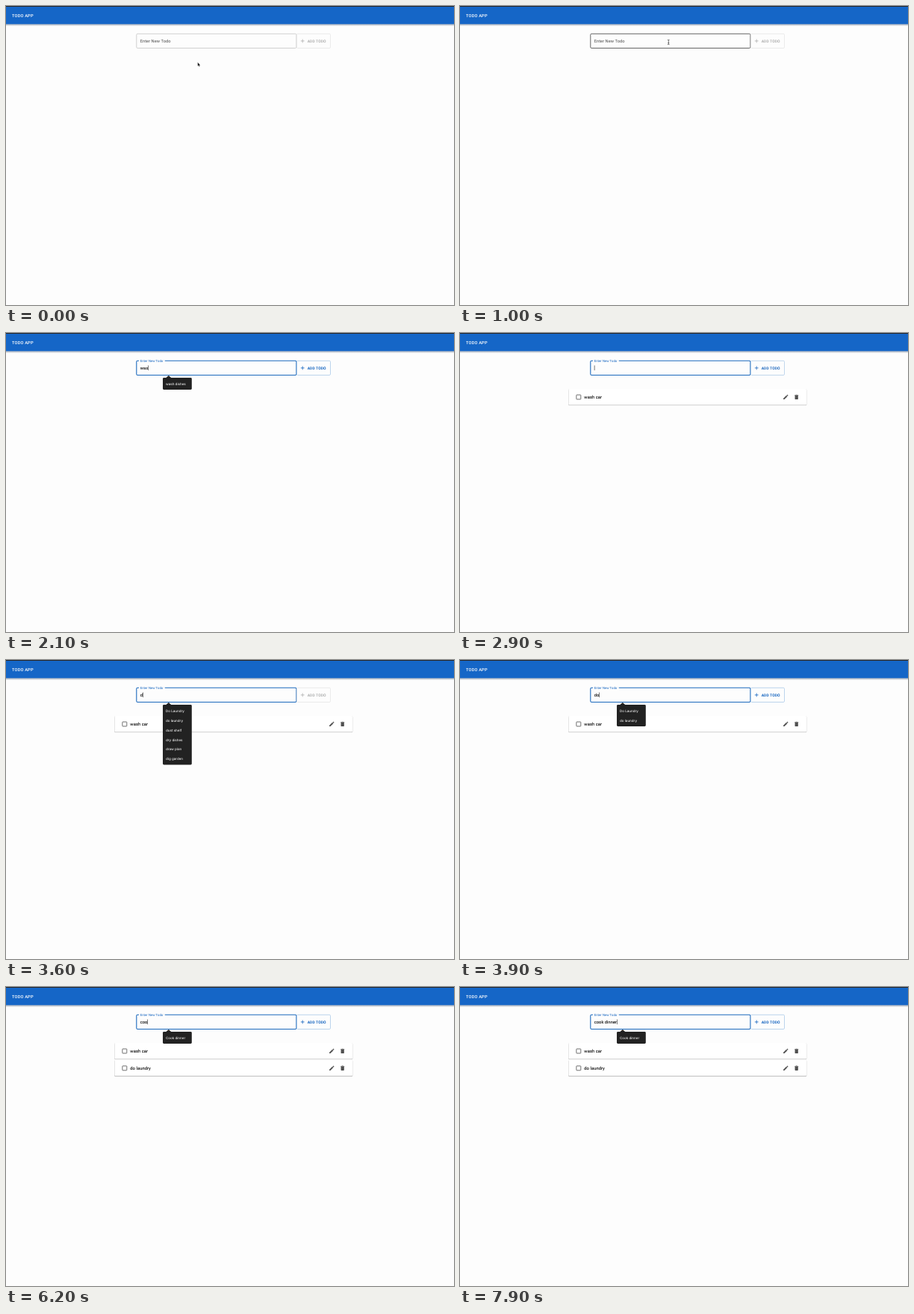
An HTML page for the animation above (8000 ms loop, 600 by 401 pixels).

```html
<!DOCTYPE html>
<html lang="en">
<head>
<meta charset="utf-8">
<title>Todo app</title>
<style>
  html, body { margin: 0; width: 100%; height: 100%; overflow: hidden; background: #fdfdfd; }
  svg { display: block; width: 100vw; height: 100vh; }
  text { font-family: Roboto, sans-serif; letter-spacing: .00938em; text-rendering: geometricPrecision; white-space: pre; }
  .title, .action { font-weight: 500; letter-spacing: .02857em; }
  .title { font-size: 5.7px; fill: #fff; }
  .action { font-size: 4.95px; stroke-width: .14; }
  .field { font-size: 5.7px; }
  .item { font-size: 5.8px; }
  .item, #value { fill: #111; stroke: #111; stroke-width: .1; }
  #menu text { font: 500 4.5px Inter, sans-serif; letter-spacing: 0; fill: #eee; }
</style>
</head>
<body>
<svg viewBox="0 0 600 401">
  <defs>
    <linearGradient id="shade" x2="0" y2="1">
      <stop stop-color="#1c3050" stop-opacity=".45"/>
      <stop offset="1" stop-color="#1c3050" stop-opacity="0"/>
    </linearGradient>
    <g id="row">
      <rect x="145" y="75.1" width="319.4" height="22.2" rx="1.5" fill="#000" fill-opacity=".1"/>
      <rect x="145.3" y="75.5" width="318.8" height="21.5" rx="1.3" fill="#000" fill-opacity=".24"/>
      <rect x="145.4" y="75" width="318.6" height="21.4" rx="1.2" fill="#fff"/>
      <rect x="155.9" y="83" width="5.9" height="5.9" rx=".5" fill="none" stroke="#555" stroke-width=".85"/>
      <g fill="#505050">
        <path transform="translate(432 81.6) scale(.357)" d="M3 17.25V21h3.75L17.81 9.94l-3.75-3.75zM20.71 7.04c.39-.39.39-1.02 0-1.41l-2.34-2.34a1 1 0 0 0-1.41 0l-1.83 1.83 3.75 3.75z"/>
        <path transform="translate(446.4 81.6) scale(.357)" d="M6 19c0 1.1.9 2 2 2h8c1.1 0 2-.9 2-2V7H6zM19 4h-3.5l-1-1h-5l-1 1H5v2h14z"/>
      </g>
    </g>
  </defs>

  <rect y="24.2" width="600" height="2.8" fill="url(#shade)"/>
  <rect width="600" height="24.3" fill="#1566c7"/>
  <rect width="600" height="1" fill="#2a2624"/>
  <text class="title" x="8" y="14.9">TODO APP</text>

  <g id="car"><use href="#row"/><text class="item" x="166.3" y="87.9">wash car</text></g>
  <g id="laundry" transform="translate(0 22.9)"><use href="#row"/><text class="item" x="166.3" y="87.9">do laundry</text></g>

  <rect id="outline" x="174.8" y="37.3" width="214.1" height="19.2" rx="1.4" fill="none"/>
  <rect id="notch" x="178" y="36.2" height="2.2" fill="#fdfdfd"/>
  <text class="field" id="label">Enter New Todo</text>
  <text class="field" id="value" x="179.8" y="48.9"></text>
  <rect id="caret" y="43.5" width=".6" height="6.6" fill="#222"/>

  <rect id="buttonEdge" x="389.4" y="37.3" width="45.1" height="19.2" rx="1.4" fill="none" stroke-width=".7"/>
  <path id="plus" d="M394.8 46.9h4.8M397.2 44.5v4.8" stroke-width=".8"/>
  <text class="action" id="buttonText" x="403.7" y="48.7">ADD TODO</text>

  <g id="menu">
    <path d="M213.8 60.4l4-3.4 4 3.4z" fill="#222"/>
    <rect id="menuBox" x="210" y="60" width="38.8" rx="1.4" fill="#222"/>
    <g id="menuItems"></g>
  </g>

  <path id="arrow" d="M0 0v5.2l1.2-1.1.8 1.8.9-.4-.8-1.7h1.6z" fill="#111" stroke="#fff" stroke-width=".3"/>
  <path id="beam" d="M278 45.3q1.3 0 1.3 1 0-1 1.3-1M279.3 46.3v4.4M278 51.7q1.3 0 1.3-1 0 1 1.3 1M278.4 49.4h1.8" fill="none" stroke="#222" stroke-width=".6"/>
</svg>

<script>
const LOOP = 8000;
const $ = id => document.getElementById(id);

// Each step holds from its time until the next one.
const typing = [
  [0, ''], [1600, 'w'], [1900, 'wa'], [2100, 'was'], [2200, 'wash'], [2300, 'wash '],
  [2400, 'wash c'], [2500, 'wash ca'], [2700, 'wash car'], [2880, ''],
  [3600, 'd'], [3800, 'do'], [4000, 'do '], [4200, 'do l'], [4400, 'do la'],
  [4500, 'do lau'], [4600, 'do laund'], [4800, 'do laundr'], [4900, 'do laundry'], [5200, ''],
  [5900, 'c'], [6000, 'co'], [6200, 'coo'], [6400, 'cook'], [6600, 'cook '],
  [6800, 'cook d'], [7200, 'cook di'], [7300, 'cook din'], [7400, 'cook dinn'], [7500, 'cook dinner']
];
const menus = [
  [0, []],
  [1250, ['wash dishes', 'Do Laundry', 'do laundry', 'Cook dinner', 'clean room', 'dust shelf']],
  [1600, ['wash dishes']], [2400, []],
  [3600, ['Do Laundry', 'do laundry', 'dust shelf', 'dry dishes', 'draw plan', 'dig garden']],
  [3800, ['Do Laundry', 'do laundry']], [5200, []],
  [5900, ['Cook dinner', 'clean room']], [6000, ['Cook dinner']]
];
// [time, enabled] of the add button
const enabling = [[-1000, 0], [1600, 1], [2880, 0], [3600, 1], [5200, 0], [5900, 1]];

const stepAt = (steps, t) => steps.findLast(([start]) => t >= start);
const progress = (t, start, length) => Math.min(1, Math.max(0, (t - start) / length));
const easeOut = p => 1 - (1 - p) ** 3;
const mix = (a, b, p) => a + (b - a) * p;
const blend = (a, b, p) => `rgb(${a.map((v, i) => Math.round(mix(v, b[i], p)))})`;
const show = (id, on) => $(id).setAttribute('visibility', on ? 'visible' : 'hidden');
const set = (id, attrs) => {
  for (const key in attrs) $(id).setAttribute(key, attrs[key]);
};

const BLUE = [21, 101, 192];

function drawPointer(t) {
  const p = easeOut(progress(t, 50, 350));
  set('arrow', { transform: `translate(${mix(256.7, 278.6, p)} ${mix(75.6, 48.4, p)})` });
  show('arrow', t < 900);
  show('beam', t >= 900 && t < 1600);
}

function drawField(t) {
  const focused = t >= 1080;
  const p = easeOut(progress(t, 1080, 200));
  set('outline', {
    stroke: focused ? '#1b69bd' : t >= 900 ? '#333' : '#c2c2c2',
    'stroke-width': focused ? 1.1 : .75
  });
  set('notch', { width: 34.8 * p });
  set('label', {
    transform: `translate(179.7 ${mix(48.8, 38.5, p)}) scale(${mix(1, .75, p)})`,
    fill: blend([75, 75, 75], BLUE, p)
  });

  const text = stepAt(typing, t)[1];
  const value = $('value');
  if (value.textContent !== text) value.textContent = text;
  set('caret', { x: 179.8 + (text ? value.getComputedTextLength() : 0) });
  show('caret', focused && !(t >= 3200 && t < 3600));
}

function drawButton(t) {
  const [start, enabled] = stepAt(enabling, t);
  const p = progress(t, start, 250);
  const on = enabled ? p : 1 - p;
  const ink = blend([176, 176, 176], BLUE, on);
  set('buttonEdge', { stroke: blend([226, 226, 226], [160, 195, 230], on) });
  set('plus', { stroke: ink });
  set('buttonText', { fill: ink, stroke: ink });
}

let openMenu;
function drawMenu(t) {
  const items = stepAt(menus, t)[1];
  if (items === openMenu) return;
  openMenu = items;
  show('menu', items.length);
  set('menuBox', { height: 3.1 + 12.9 * items.length });
  $('menuItems').innerHTML = items
    .map((item, i) => `<text x="214" y="${69.8 + 12.9 * i}">${item}</text>`).join('');
}

function draw() {
  const t = performance.now() % LOOP;
  drawPointer(t);
  drawField(t);
  drawButton(t);
  drawMenu(t);
  show('car', t >= 2880);
  show('laundry', t >= 5200);
  requestAnimationFrame(draw);
}
draw();
</script>
</body>
</html>
```
